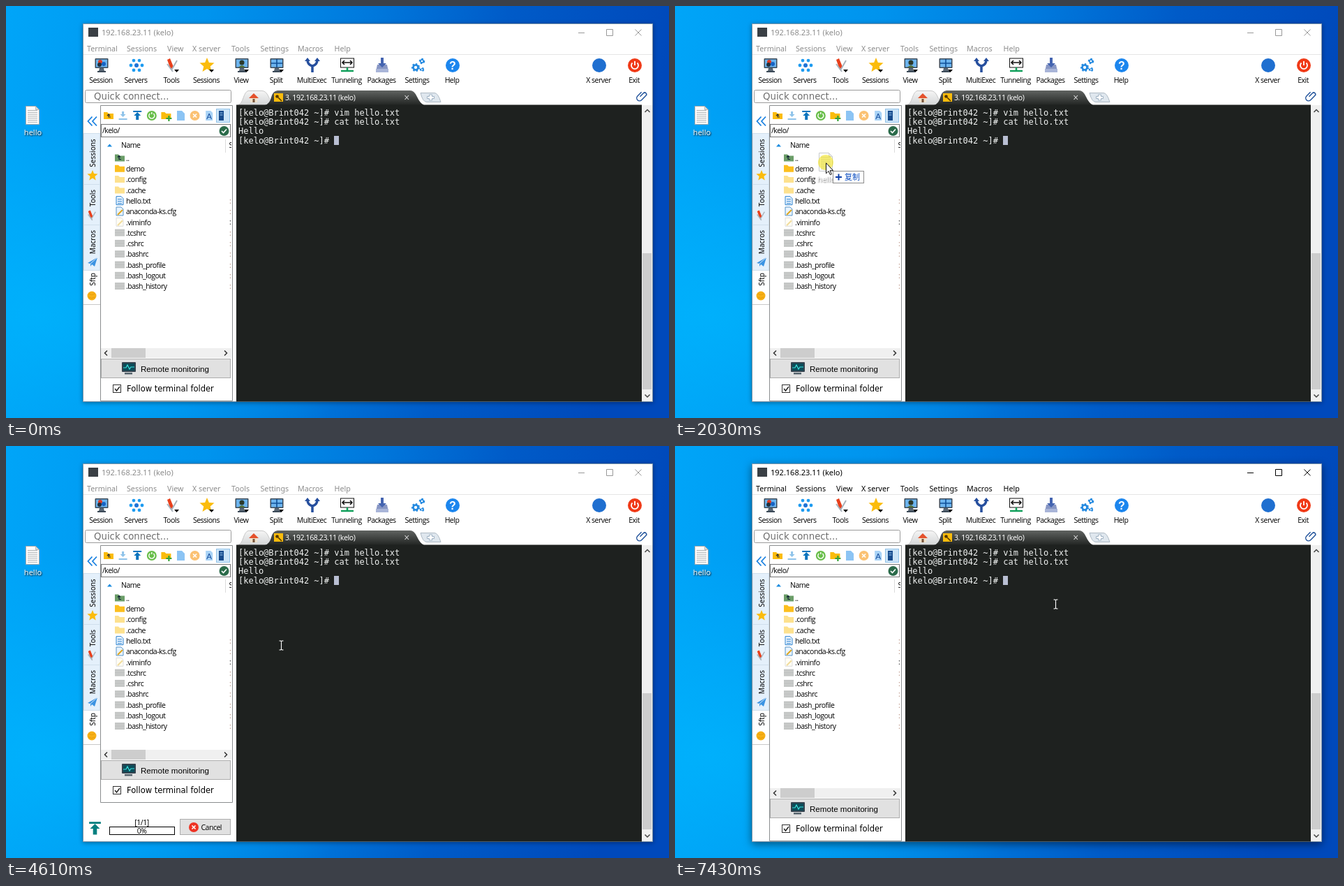
An HTML page for the animation above (8000 ms loop, 950 by 590 pixels).

```html
<!DOCTYPE html>
<html lang="en">
<head>
<meta charset="utf-8">
<title>Drag and drop upload</title>
<style>
html, body { margin: 0; width: 100%; height: 100%; overflow: hidden; background: #0078d8; }
svg { display: block; width: 950px; height: 590px; }
text { white-space: pre; }
.small { font: 10.5px "Open Sans", "Noto Sans", sans-serif; letter-spacing: -.5px; }
.menu { font: 10.7px "Noto Sans", "Open Sans", sans-serif; }
.title { font: 11px "Noto Sans", "Open Sans", sans-serif; }
.tab { font: 10.5px "Noto Sans", "Open Sans", sans-serif; letter-spacing: -.4px; }
.side { font: 10px "Noto Sans", "Open Sans", sans-serif; }
.quick { font: 13.3px "DejaVu Sans", sans-serif; }
.check { font: 11.5px "DejaVu Sans", sans-serif; }
.button { font: 11.6px "Liberation Sans", sans-serif; }
.mono { font: 12px "DejaVu Sans Mono", monospace; }
.cjk { font: 11px "Noto Sans CJK SC", "Noto Sans CJK", sans-serif; }
.desk { font: 11px "Noto Sans", sans-serif; text-shadow: 1px 1px 2px #000; }
</style>
</head>
<body>
<svg id="stage" viewBox="0 0 950 590"></svg>
<script>
const LOOP = 8000;
const USER = 'kelo', HOST = 'Brint042', IP = '192.168.23.11';
const BLUE = '#2389e0', TEAL = '#078080', GOLD = '#fbbc0c';

const rect = (x, y, w, h, fill = 'none', stroke = 'none', rx = 0) =>
  `<rect x="${x}" y="${y}" width="${w}" height="${h}" rx="${rx}" fill="${fill}" stroke="${stroke}"/>`;
const circ = (x, y, r, fill) => `<circle cx="${x}" cy="${y}" r="${r}" fill="${fill}"/>`;
const path = (d, fill = 'none', stroke = 'none', w = 1) =>
  `<path d="${d}" fill="${fill}" stroke="${stroke}" stroke-width="${w}"/>`;
const line = (d, stroke, w = 1) => path(d, 'none', stroke, w);
const text = (x, y, s, cls, fill = '#000', anchor = 'start') =>
  `<text x="${x}" y="${y}" class="${cls}" fill="${fill}" text-anchor="${anchor}">${s}</text>`;
const group = (body, attrs = '') => `<g ${attrs}>${body}</g>`;
const at = (x, y, body) => group(body, `transform="translate(${x} ${y})"`);

// Icons are drawn around their own centre.
const star = r => path('M' + Array.from({ length: 10 }, (_, i) => {
  const a = i * Math.PI / 5, q = i % 2 ? r * .45 : r;
  return (q * Math.sin(a)).toFixed(1) + ' ' + (-q * Math.cos(a)).toFixed(1);
}).join('L') + 'Z', GOLD);
const folder = (fill, extra = '') => path('M-7-5h5l2 2h7v8h-14z', fill) + extra;
const page = (fill, stroke, extra = '') => path('M-5-6h7l3 3v9h-10z', fill, stroke) + extra;
const monitor = inner => rect(-9.5, -10, 19, 14, '#3c4a58', 'none', 1) + rect(-8, -8.5, 16, 11, '#6cb4ee') +
  path('M-3 4h6l1 4h-8z', '#586674') + rect(-6, 8, 12, 2, '#3c4a58') + inner;
const knife = path('M-7-8l4-2 5 12-4 4z', '#e8401c') + line('M-1 7L7-7M-7-2L1 9', '#a9b2ba', 2);
const gear = r => circ(0, 0, r, BLUE) +
  `<circle r="${r}" fill="none" stroke="${BLUE}" stroke-width="2.5" stroke-dasharray="2.2 2.2"/>` + circ(0, 0, r * .45, '#fff');
const dropMark = path('M3 6h7l-3.5 4z', '#000');
const plane = path('M-7 1L7-7 3 6-1 3-3 6-3 2z', '#3b93e2') + line('M-3 2L7-7', '#fff', .8);
const upArrow = (c, k = 1) => group(line('M-6-6h12', c, 2) + path('M0-5l5 5h-3v6h-4v-6h-3z', c), `transform="scale(${k})"`);
const cross = (r, c) => circ(0, 0, r, c) + line('M-2.5-2.5l5 5M2.5-2.5l-5 5', '#fff', 1.7);
const house = path('M-7 1L0-6 7 1z', '#e4512b') + rect(-5, 1, 10, 6, '#f1e3cc') + rect(-1.5, 2, 3, 5, '#77543a');

const tools = [
  [136, 'Session', monitor(circ(-2, -5, 3, '#e03a24') + circ(-3, -1, 3, '#22313f') + circ(3, -2, 3, '#1763c4'))],
  [186, 'Servers', [0, 1, 2, 3, 4, 5].map(i => circ(8 * Math.cos(i * 1.047), 8 * Math.sin(i * 1.047), 2.4, '#1d9bf0')).join('') + circ(0, 0, 3, '#1d74d8')],
  [237, 'Tools', knife + dropMark],
  [287, 'Sessions', star(11) + dropMark],
  [337, 'View', monitor(circ(0, -4, 3.5, '#2c3a2c') + path('M-5 3q5-6 10 0z', '#54703a')) + dropMark],
  [387, 'Split', monitor(line('M0-9V3M-8-3H8', '#0f4f98', 1.6)) + dropMark],
  [438, 'MultiExec', line('M0 10V1Q-7-1-7-8M0 1Q7-1 7-8', '#264f9e', 3.5) + path('M-11-6l4-5 4 5zM3-6l4-5 4 5z', '#264f9e')],
  [488, 'Tunneling', rect(-9.5, -10, 19, 13, '#fff', '#111') + line('M-6-4h12M-4-7l-3 3 3 3M4-7l3 3-3 3', '#111', 1.6) + line('M0 3v5M-9 8h18', '#12a05c', 2.5)],
  [538, 'Packages', path('M-7-1h14l2 10h-18z', '#8796c4') + rect(-9, 5, 18, 5, '#a9b5d8') + path('M-2-11h4v8h4l-6 6-6-6h4z', '#4464b0')],
  [589, 'Settings', at(-3, 3, gear(4.8)) + at(6, -6, gear(3)) + at(6, 6, gear(2))],
  [639, 'Help', circ(0, 0, 10, '#1c86ee') + text(0, 5.5, '?', 'button', '#fff', 'middle').replace('<text', '<text style="font-size:16px;font-weight:700"')],
  [849, 'X server', circ(0, 0, 10, '#1f6fd0')],
  [900, 'Exit', circ(0, 0, 10, '#f03a17') + line('M-3.5-3.5a5 5 0 1 0 7 0M0-6v6', '#fff', 1.8)]
];

const gray = rect(-7, -5, 14, 10, '#c3c5c4') + line('M-7-2H7M-7 2H7', '#d3d5d4', .6);
const lines = c => line('M-3-2h6M-3 1h6M-3 4h6', c);
const files = [
  ['..', folder('#6b9d68', line('M2 2H-1V-3M-3-1l2-2 2 2', '#123', 1.2))],
  ['demo', folder('#fcbf1e')],
  ['.config', folder('#fde18e')],
  ['.cache', folder('#fde18e')],
  ['hello.txt', page('#e9f4ff', '#2b82cf', lines('#2b82cf'))],
  ['anaconda-ks.cfg', page('#e9f4ff', '#5794c8', line('M-3 5L4-2', '#e0a61c', 2))],
  ['.viminfo', page('#fffdf4', '#ddd', line('M-3 5L4-2', '#f1dc9c', 2))],
  ...['.tcshrc', '.cshrc', '.bashrc', '.bash_profile', '.bash_logout', '.bash_history'].map(n => [n, gray])
];
const rowY = i => 218 + 15.3 * i;

function desktop() {
  return `<defs>
    <linearGradient id="sky" x2="1" y2=".12"><stop offset="0" stop-color="#00a5f8"/><stop offset=".3" stop-color="#0094ee"/>
      <stop offset=".55" stop-color="#0078dc"/><stop offset=".75" stop-color="#005bc8"/><stop offset="1" stop-color="#0049bb"/></linearGradient>
    <radialGradient id="glow" cx=".05" cy=".75" r=".5"><stop stop-color="#00b8ff" stop-opacity=".7"/><stop offset="1" stop-color="#00b8ff" stop-opacity="0"/></radialGradient>
    <linearGradient id="dark" x2="0" y2="1"><stop stop-color="#606361"/><stop offset="1" stop-color="#222523"/></linearGradient>
    <linearGradient id="pale" x2="0" y2="1"><stop stop-color="#f5f5f5"/><stop offset="1" stop-color="#d5d7d8"/></linearGradient>
    <clipPath id="sliver"><rect x="319" y="190" width="4" height="225"/></clipPath>
    <clipPath id="rest"><rect x="248" y="536" width="60" height="24"/></clipPath></defs>` +
    rect(0, 0, 950, 590, 'url(#sky)') + rect(0, 0, 950, 590, 'url(#glow)') +
    group(rect(6.5, 141.5, 64, 48, 'rgba(140,215,255,.3)', 'rgba(160,222,255,.75)'), 'id="hover"') +
    group(note(), 'id="note"');
}

function note() {
  return path('M28.5 143.5h14l5 5v21h-19z', '#fdfdfd', '#a5a9ac') + path('M42.5 143.5v5h5z', '#d9dcde', '#a5a9ac', .7) +
    line([0, 1, 2, 3, 4, 5, 6].map(i => `M31 ${149.5 + i * 2.8}h14`).join(''), '#a3a7aa', .9) +
    text(38.5, 185, 'hello', 'desk', '#fff', 'middle');
}

function frame() {
  const menus = [[116, 'Terminal'], [173, 'Sessions'], [231, 'View'], [267, 'X server'], [323, 'Tools'], [364.5, 'Settings'], [418, 'Macros'], [470.5, 'Help']];
  return rect(110, 25, 817, 542, '#fff').replace('/>', ' id="shadow"/>') + rect(110.5, 25.5, 816, 541, '#fff', '#8298aa') +
    rect(118, 31, 14, 13, '#3a3f45') +
    group(text(137, 42, `${IP} (${USER})`, 'title', 'inherit') + menus.map(([x, s]) => text(x, 65, s, 'menu', 'inherit')).join(''), 'id="captions"') +
    `<path id="controls" fill="none" d="M820 38.5h9M860.5 33.5h9v9h-9zM901.5 33.5l9 9M910.5 33.5l-9 9"/>` +
    line('M111 69.5H926', '#e6e6e6') +
    tools.map(([x, s, icon]) => at(x + 1, 85, icon) + text(x, 109.5, s, 'small', '#000', 'middle')).join('') +
    rect(113.5, 120.5, 209, 18, '#fff', '#9b9b9b', 2) + text(126, 134, 'Quick connect...', 'quick', '#6f6f6f');
}

function terminal() {
  const prompt = `[${USER}@${HOST} ~]# `;
  const rows = [prompt + 'vim hello.txt', prompt + 'cat hello.txt', 'Hello', prompt];
  return path('M333 141.5q4-1 7-10t7-10h20q6 0 10 10t8 10z', 'url(#pale)', '#c8c8c8') + at(355, 131, house) +
    path('M371 142q7-2 9-11t9-10h190q6 0 10 9t10 12z', 'url(#dark)') + rect(384, 125, 13, 12, GOLD) +
    circ(388.5, 129.5, 2.3, '#553800') + line('M390 131l5 5', '#553800', 1.6) +
    text(400, 135, `3. ${IP} (${USER})`, 'tab', '#fff') + line('M571.5 128l5.5 6M577 128l-5.5 6', '#ddd', 1.1) +
    path('M594 124.5h20q5 0 9 13h-20q-6 0-9-13z', '#dfe7ee', '#aebac4') + path('M606.5 127h4v2.5h3v3h-3v2.5h-4v-2.5h-3v-3h3z', '#fff', '#8fa4b8', .8) +
    at(912, 129, group(line('M-2 3V-4a2.5 2.5 0 0 1 5 0V5a4 4 0 0 1-8 0V-3', '#24559c', 1.5), 'transform="rotate(45)"')) +
    rect(330, 141.5, 581, 425, '#1e211f') +
    rows.map((s, i) => text(333, 156.5 + i * 13.35, s, 'mono', '#f0f2f1')).join('') + rect(470, 186, 7, 13, '#b9bfd3') +
    rect(911, 142, 15, 424, '#f0f0f0') + rect(912, 354, 13, 195, '#cdcdcd') +
    line('M915.5 152l3.5-3.5 3.5 3.5M915.5 556.5l3.5 3.5 3.5-3.5', '#444', 1.5);
}

function sidebar() {
  const label = (y, s, bold) => group(text(0, 3.7, s, 'side', '#000', 'middle'), `transform="translate(124 ${y}) rotate(-90)"${bold ? ' font-weight="700" style="-webkit-text-stroke:.35px #000"' : ''}`);
  return line('M123.5 158.5l-6 6.5 6 6.5M130 158.5l-6 6.5 6 6.5', '#1c82e0', 1.8) +
    [[182, 73], [255, 58], [313, 65]].map(([y, h]) => rect(111.5, y + .5, 23, h, '#e4f0fb', '#d0dfec')).join('') +
    line('M111 427.5h24', '#c9c9c9') +
    label(210.5, 'Sessions') + label(275, 'Tools') + label(338, 'Macros') + label(391.5, 'Sftp', true) +
    at(124, 243, star(8)) + at(123, 300, group(knife, 'transform="scale(.75)"')) + at(124, 367, plane) +
    circ(123, 415, 6.5, '#f7b016') + line('M118.5 412q4 3 9 0M118.5 417q4 3 9 0', '#e79d09');
}

function panel() {
  const bar = [
    folder(GOLD, line('M3 2H0V-2M-2 0l2-2 2 2', '#333', 1.2)),
    path('M0 2l-4-4h2.5v-4h3v4h2.500z', '#8fc3ea') + line('M-6 5h12', '#8fc3ea', 2),
    upArrow('#0b74bd'),
    circ(0, 0, 7, '#6abf4b') + line('M-2.500-3a4 4 0 1 0 5 0M0-5v3', '#fff', 1.4),
    folder(GOLD, line('M4 0v8M0 4h8', '#36a336', 2.2)),
    path('M-5-7h7l4 4v10h-11z', '#8cc4f4'),
    cross(7, '#fbc274'),
    path('M-5-7h7l3 3v11h-10z', '#a9d3f6') + text(0, 4.5, 'A', 'button', '#174fa0', 'middle')
  ];
  return '<path id="edge" fill="none" stroke="#8a8d8f"/>' +
    bar.map((icon, i) => at(147 + i * 20.6, 157, icon)).join('') +
    rect(301.5, 147.5, 19, 19, '#cce4f7', '#91c2e8') + rect(305, 150, 7, 14, '#174b8d') + line('M306.500 153h4M306.5 156h4', '#9cc9f0') +
    rect(136.5, 169.5, 185, 18, '#fff', '#777') + text(138, 181.5, `/${USER}/`, 'small') +
    circ(312.5, 179, 7, '#2b6b4a') + line('M309 179l2.500 2.500 4.500-5', '#fff', 1.7) +
    path('M145 201.5l3.500-4 3.500 4z', '#1b8ce0') + text(165, 203, 'Name', 'small') + line('M314.5 191v19', '#dcdcdc') +
    files.map(([s, icon], i) => group(at(163, rowY(i) - .5, icon) + text(172, rowY(i) + 3.7, s, 'small') +
      (i > 3 ? group(text(320, rowY(i) + 3.5, ':', 'small', i === 6 ? '#222' : '#b58a78'), 'clip-path="url(#sliver)"') : ''), `id="file${i}"`)).join('') +
    group(text(319.5, 203, 'S', 'small'), 'clip-path="url(#sliver)"') +
    group(foot(), 'id="foot"') +
    group(rect(137, 509, 185, 2.5, '#c9c9c9') + rect(166, 509, 20, 2.5, '#3b6770') +
      group(followLabel(), 'clip-path="url(#rest)"'), 'id="torn"') +
    group(transfer(), 'id="transfer"');
}

function followLabel() { return text(173, 552, 'Follow terminal folder', 'check'); }

function foot() {
  return rect(136, 490, 187, 14, '#f0f0f0') + rect(151, 490, 49, 14, '#cdcdcd') +
    line('M145 493.5l-3.500 3.500 3.500 3.500M313 493.500l3.500 3.500-3.500 3.500', '#333', 1.5) +
    rect(136.5, 505.5, 185, 27, '#e1e1e1', '#adadad') +
    rect(166, 510, 20, 14, '#33424e', 'none', 1) + rect(168, 512, 16, 10, '#0b4d5a') + rect(170, 525, 11, 2.5, '#56636d') +
    line('M168 518h4l2-4 3 6 2-3h5', '#3be0dc', 1.2) + text(193, 523.500, 'Remote monitoring', 'button') +
    rect(153.5, 542.5, 11, 11, '#fff', '#333') + line('M156 548l2.500 3 4.500-6', '#222', 1.4) + followLabel();
}

function transfer() {
  return at(127.5, 548, upArrow(TEAL, 1.4)) + text(194.5, 542.5, '[1/1]', 'small', '#000', 'middle') +
    rect(148.5, 545.5, 93, 11, '#fff', '#000') + text(194.5, 555, '0%', 'small', '#000', 'middle') +
    rect(249.5, 534.5, 72, 22, '#e1e1e1', '#adadad') + at(269, 546, cross(7, '#ee3324')) + text(279.5, 549.700, 'Cancel', 'small');
}

function pointer() {
  return group(group(note(), 'id="ghost" transform="translate(-38 -157)" opacity=".6"') +
    `<circle id="press" r="11" fill="#f4e300" fill-opacity=".52"/>` +
    path('M.5.8v15l3.500-3.300 2.400 5.200 2-.9-2.300-5.100h4.600z', '#fff', '#111').replace('<path', '<path id="arrow"') +
    group(line('M-3-6.5h2l1 1 1-1h2M0-5.500v11M-3 6.500h2l1-1 1 1h2', '#fff', 1.1), 'id="beam" transform="translate(.5 .5)"') +
    group(rect(10.5, 12.500, 44, 17, '#fff', '#8d8d8d') + line('M14 21h9M18.500 16.500v9', '#0d3fa8', 2) + text(27, 25, '复制', 'cjk', '#0d4ec0'), 'id="copy"'),
    'id="pointer"');
}

// Pointer moves: start, end, number of steps, goal, optional curve control point.
const moves = [
  [130, 870, 10, 70, 214, 430, 420],
  [940, 1410, 7, 38, 157],
  [1620, 1690, 2, 133, 186],
  [1760, 2030, 5, 216, 224],
  [3030, 3030, 1, 230, 228],
  [3120, 3120, 1, 233, 228],
  [3520, 4280, 11, 361, 276],
  [4360, 4440, 2, 406, 289],
  [4530, 4610, 2, 394, 285],
  [4940, 5290, 6, 426, 288],
  [5910, 6600, 11, 424, 345, 261, 447],
  [6870, 7430, 9, 545, 226]
];
const ease = u => u * u * (3 - 2 * u);

function pointerAt(t) {
  let x = 751, y = 548;
  for (const [start, end, n, gx, gy, cx = (x + gx) / 2, cy = (y + gy) / 2] of moves) {
    if (t < start) break;
    const k = Math.min(n, 1 + Math.floor((t - start) / Math.max(1, end - start) * (n - 1) + 1e-6));
    const u = ease(k / n), v = 1 - u;
    x = v * v * x + 2 * u * v * cx + u * u * gx;
    y = v * v * y + 2 * u * v * cy + u * u * gy;
  }
  return [Math.round(x), Math.round(y)];
}

const stage = document.getElementById('stage');
stage.innerHTML = desktop() + frame() + terminal() + sidebar() + panel() + pointer();
const el = {};
stage.querySelectorAll('[id]').forEach(e => el[e.id] = e);
const show = (name, on) => el[name].style.display = on ? '' : 'none';
const within = (t, a, b) => t >= a && t < b;

function draw(t) {
  const [x, y] = pointerAt(t);
  const focused = t >= 5570, open = within(t, 3030, 6250), torn = within(t, 3030, 3120);
  const inTerminal = x >= 329 && y > 142;

  el.captions.setAttribute('fill', focused ? '#000' : '#8c8c8c');
  el.controls.setAttribute('stroke', focused ? '#000' : '#999');
  el.shadow.style.filter = focused ? 'drop-shadow(0 3px 6px rgba(0,0,0,.5))' : 'drop-shadow(0 1px 3px rgba(0,0,0,.4))';

  el.foot.setAttribute('transform', `translate(0 ${open ? -55 : 0})`);
  const bottom = open ? 510.5 : 565.5;
  el.edge.setAttribute('d', `M135.5 142.500V${bottom}${torn ? 'M' : 'L'}324.500 ${bottom}V142.500H135.500`);
  show('file4', !torn);
  show('file12', !torn);
  show('torn', torn);
  show('transfer', open && !torn);

  const dragging = within(t, 1620, 2430);
  show('hover', x < 71 && y < 190 && t < 1620);
  show('pointer', within(t, 130, 2430) || t >= 2710);
  el.pointer.setAttribute('transform', `translate(${x} ${y})`);
  show('ghost', dragging);
  show('copy', dragging && x > 136);
  show('press', within(t, 1550, 2430) || within(t, 5440, 5640));
  show('arrow', !inTerminal);
  show('beam', inTerminal);
}

const begin = performance.now();
function tick() {
  draw((performance.now() - begin) % LOOP);
  requestAnimationFrame(tick);
}
tick();
</script>
</body>
</html>
```
